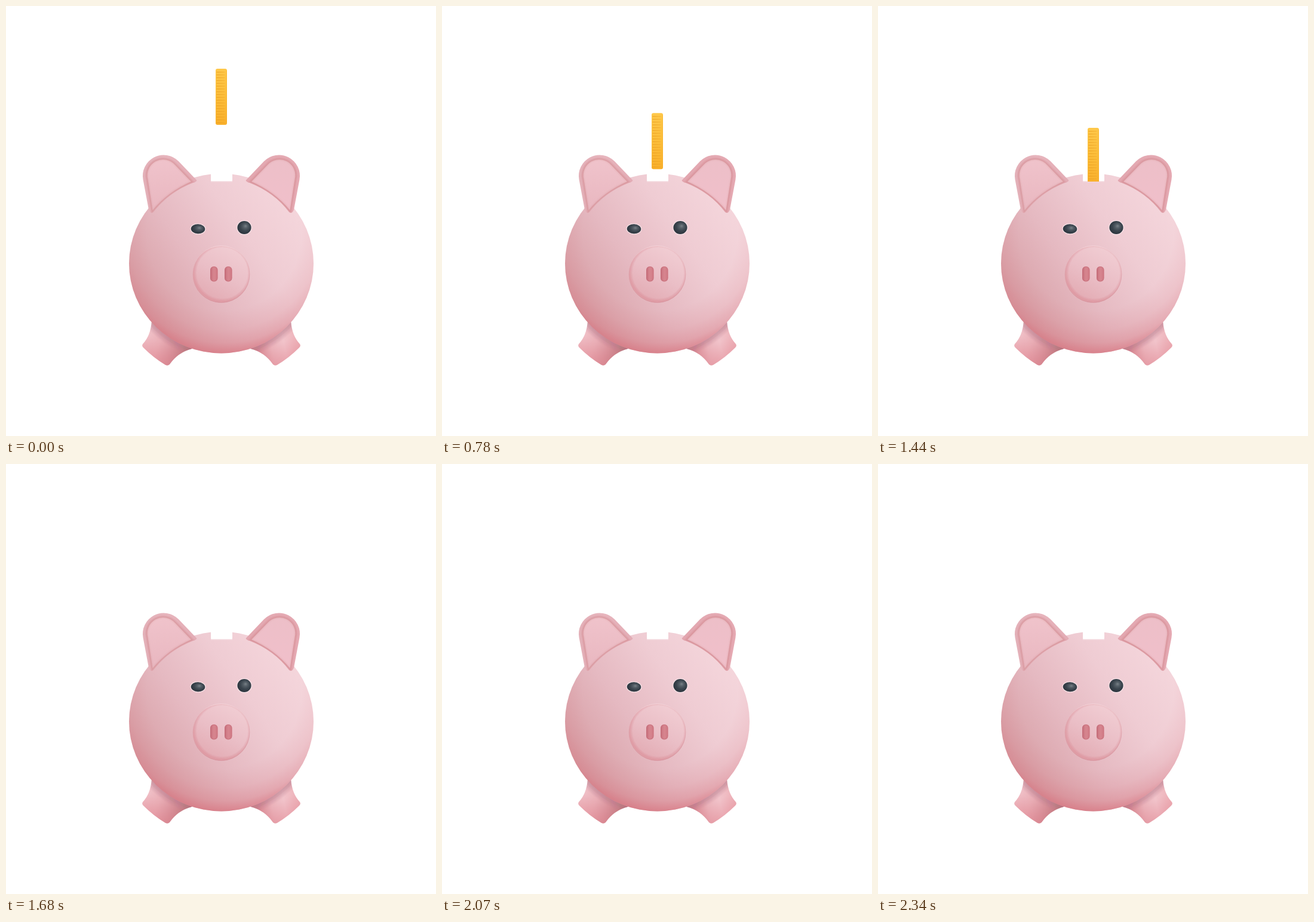
These frames come from a looping animation (720 px wide and 720 px high, 2700 ms). An HTML page with a canvas:

```html
<!DOCTYPE html>
<html lang="en">
<head>
<meta charset="utf-8">
<title>Piggy bank</title>
<style>
html, body { margin: 0; width: 100%; height: 100%; overflow: hidden; background: #fff; }
canvas { display: block; width: 720px; height: 720px; }
</style>
</head>
<body>
<canvas id="stage" width="720" height="720"></canvas>
<script>
const ctx = document.getElementById('stage').getContext('2d');
const LOOP = 2700, STEP = 30;
const DROP_EVERY = 600, DROP_TIME = 480, DROP_SPEED = 0.4125;
const WOBBLE_START = 1800, WOBBLE_TIME = 540, WOBBLE_ANGLE = 6.35 * Math.PI / 180;
const AXIS = 360.5;

function addStops(g, stops) {
  stops.forEach(([at, color]) => g.addColorStop(at, color));
  return g;
}
const linear = (x0, y0, x1, y1, ...stops) =>
  addStops(ctx.createLinearGradient(x0, y0, x1, y1), stops);
const radial = (x, y, r0, r1, ...stops) =>
  addStops(ctx.createRadialGradient(x, y, r0, x, y, r1), stops);

function fill(path, style) {
  ctx.fillStyle = style;
  ctx.fill(path);
}

function ellipse(x, y, rx, ry, turn = 0) {
  const p = new Path2D();
  p.ellipse(x, y, rx, ry, turn, 0, Math.PI * 2);
  return p;
}

function pill(x, y, w, h, r) {
  const p = new Path2D();
  p.roundRect(x, y, w, h, r);
  return p;
}

// Stacked thin strokes give a soft line.
function softStroke(path, rgb, alpha, width) {
  for (let w = width; w > 0; w -= 2) {
    ctx.strokeStyle = `rgba(${rgb},${alpha})`;
    ctx.lineWidth = w;
    ctx.stroke(path);
  }
}

function clipped(path, draw) {
  ctx.save();
  ctx.clip(path);
  draw();
  ctx.restore();
}

function mirrored(draw) {
  ctx.save();
  ctx.translate(AXIS * 2, 0);
  ctx.scale(-1, 1);
  draw();
  ctx.restore();
}

const body = ellipse(AXIS, 431, 154.5, 150.5);
const snout = ellipse(360.5, 449, 47.5, 47.5);
const foot = new Path2D('M244 528 Q242 552 229 566 Q227 569 230 572 ' +
  'Q247 589 267 601 Q271 603 274 600 Q288 580 311 574 L330 540 Z');
const ear = new Path2D('M239 341 L229.6 291 A35 35 0 0 1 289 260 L319.5 292 ' +
  'Q318 295 313 296 Q272 312 247 345 Q242 349 239 341 Z');
const earInner = new Path2D('M245.5 342 L237.4 290 A26.5 26.5 0 0 1 283 266 L310 294 ' +
  'Q271 311 245.5 342 Z');

function drawFoot(right) {
  fill(foot, right
    ? linear(230, 565, 300, 580, [0, '#eeb4bb'], [0.35, '#f1c3ca'], [0.65, '#eab0b8'], [1, '#d7838d'])
    : linear(232, 555, 303, 585, [0, '#f1c3ca'], [0.35, '#e9adb5'], [0.65, '#d9919a'], [1, '#c0747c']));
  fill(foot, linear(262, 566, 247, 590, [0, 'rgba(223,126,138,0)'], [1, 'rgba(223,126,138,.4)']));
  clipped(foot, () => fill(body2, 'rgba(165,115,120,.10)'));
  clipped(foot, () => softStroke(body, '175,125,130', 0.05, 24));
}
const body2 = ellipse(AXIS, 431, 160, 156);

function drawEar(right) {
  fill(ear, right
    ? linear(229, 290, 318, 285, [0, '#e5a9b2'], [0.5, '#e4aab3'], [1, '#e2a6af'])
    : linear(229, 290, 318, 285, [0, '#e3b0b8'], [0.5, '#e7b5bd'], [1, '#e3acb5']));
  clipped(ear, () => {
    softStroke(earInner, '207,128,142', 0.13, 8);
    fill(earInner, right
      ? linear(264, 258, 264, 335, [0, '#edbfc8'], [1, '#f0bfca'])
      : linear(264, 258, 264, 335, [0, '#f0c3cb'], [1, '#e9b8c1']));
    softStroke(earInner, '207,128,142', 0.06, 5);
  });
}

function drawBody() {
  fill(body, linear(470, 325, 222, 500,
    [0, '#f4d5db'], [0.3, '#efccd3'], [0.62, '#e5b9c1'], [0.85, '#dca8af'], [1, '#d69ba2']));
  fill(body, radial(365, 380, 130, 202,
    [0, 'rgba(214,112,123,0)'], [0.45, 'rgba(214,112,123,.13)'],
    [0.75, 'rgba(214,112,123,.32)'], [1, 'rgba(214,108,120,.68)']));
  ctx.fillStyle = '#fff';
  ctx.fill(pill(343, 274, 36, 19.5, [0, 0, 1.5, 1.5]));
  ctx.fillStyle = '#f7e1e5';
  ctx.fillRect(343, 293.2, 36, 1.3);
}

function drawSnout() {
  fill(snout, linear(385, 405, 335, 495, [0, '#f1cdd3'], [0.5, '#eabec6'], [1, '#e2a9b1']));
  clipped(snout, () => {
    ctx.save();
    ctx.translate(1.5, -2);
    softStroke(snout, '207,122,134', 0.09, 9);
    ctx.restore();
  });
  ctx.lineWidth = 1;
  ctx.strokeStyle = linear(360, 402, 360, 497,
    [0, 'rgba(247,220,225,.75)'], [0.5, 'rgba(217,150,159,.45)'], [1, 'rgba(208,132,142,.6)']);
  ctx.stroke(snout);
  for (const x of [342, 366]) {
    const hole = pill(x, 436, 12.5, 25.5, 6);
    fill(hole, linear(x, 0, x + 12, 0, [0, '#c66f7b'], [0.5, '#d7858f'], [1, '#d17c87']));
    clipped(hole, () => softStroke(hole, '188,96,108', 0.16, 4));
  }
}

function drawEye(x, y, rx, ry, turn) {
  fill(ellipse(x, y, rx + 1.3, ry + 1.3, turn), 'rgba(250,232,236,.8)');
  ctx.save();
  ctx.translate(x, y);
  ctx.rotate(turn);
  ctx.scale(rx, ry);
  const shine = ctx.createRadialGradient(0.2, -0.25, 0, 0.1, -0.1, 1.1);
  fill(ellipse(0, 0, 1, 1), addStops(shine,
    [[0, '#788187'], [0.3, '#535d65'], [0.65, '#39434c'], [1, '#2c353e']]));
  ctx.restore();
}

function drawPig(angle) {
  ctx.save();
  ctx.translate(360, 360);
  ctx.rotate(angle);
  ctx.translate(-360, -360);
  drawFoot(false);
  mirrored(() => drawFoot(true));
  drawBody();
  drawEar(false);
  mirrored(() => drawEar(true));
  drawSnout();
  drawEye(321.5, 373.3, 11.8, 8, 0.04);
  drawEye(399, 371, 11.6, 11, 0);
  ctx.restore();
}

function drawCoin(top) {
  ctx.save();
  ctx.beginPath();
  ctx.rect(340, 90, 40, 204);
  ctx.clip();
  ctx.translate(0, top);
  fill(pill(351, 0, 19, 94, 3), linear(0, 0, 0, 94, [0, '#fec84a'], [0.5, '#fcbe3a'], [1, '#f9b02c']));
  ctx.fillStyle = linear(352, 0, 367, 0, [0, 'rgba(232,155,28,.75)'], [1, 'rgba(232,155,28,.3)']);
  for (let y = 5; y < 91; y += 4.7) ctx.fillRect(352.5, y, 14, 1.4);
  ctx.fillStyle = 'rgba(242,166,32,.35)';
  ctx.fillRect(368.5, 3, 1.5, 88);
  ctx.restore();
}

function draw() {
  const t = Math.floor(performance.now() % LOOP / STEP) * STEP;
  const swing = (t - WOBBLE_START) / WOBBLE_TIME;
  const angle = swing > 0 && swing < 1 ? WOBBLE_ANGLE * Math.sin(swing * Math.PI * 2) : 0;
  ctx.fillStyle = '#fff';
  ctx.fillRect(0, 0, 720, 720);
  drawPig(angle);
  const fall = t % DROP_EVERY;
  if (t < WOBBLE_START && fall < DROP_TIME) drawCoin(105 + fall * DROP_SPEED);
  requestAnimationFrame(draw);
}
draw();
</script>
</body>
</html>
```
